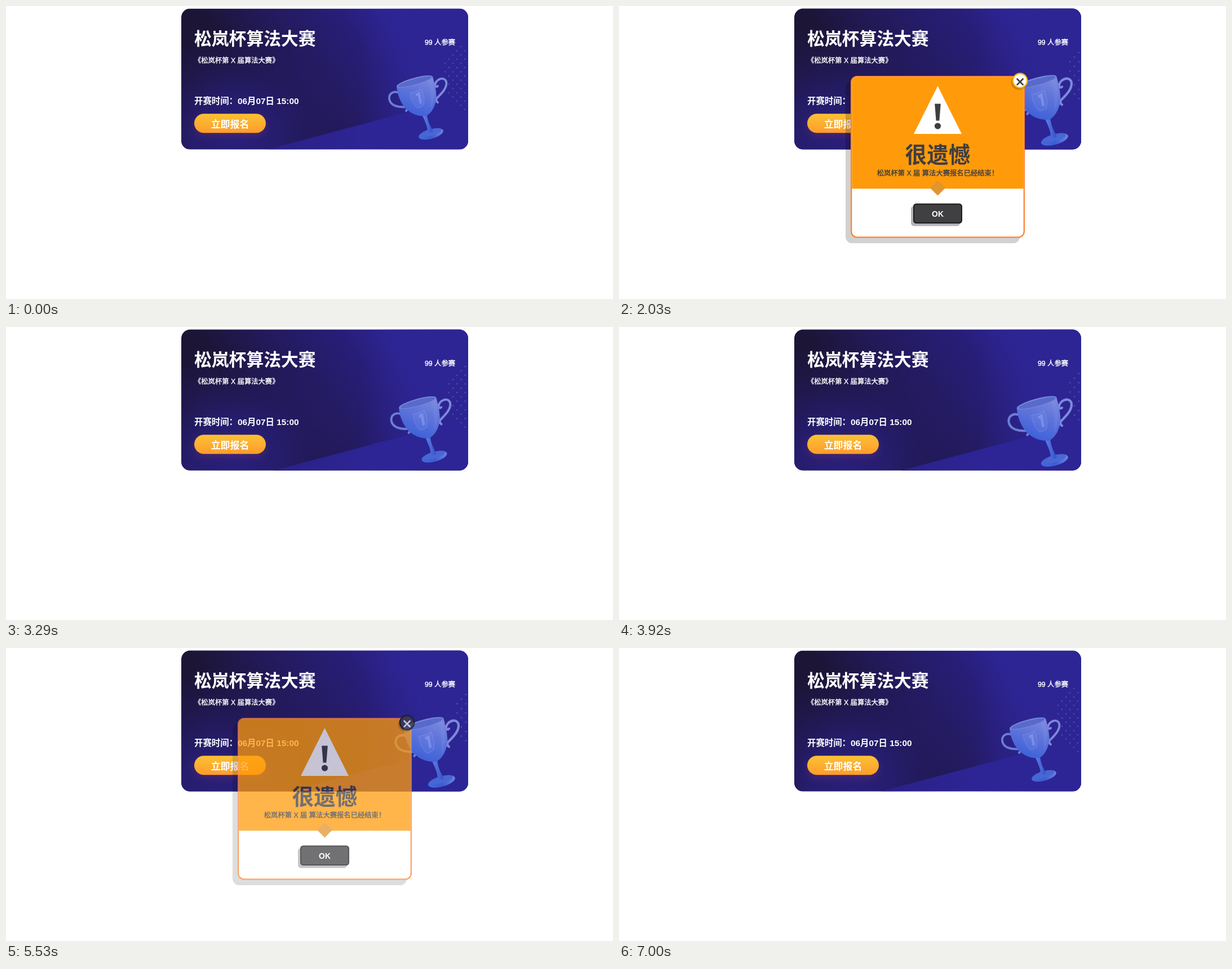
An HTML page with a canvas for the animation above (7.07 s loop, 1077 by 520 pixels).

```html
<!DOCTYPE html>
<html lang="zh-CN">
<head>
<meta charset="utf-8">
<title>算法大赛报名</title>
<style>
html, body { margin: 0; width: 100%; height: 100%; overflow: hidden; background: #fff; }
canvas { display: block; }
</style>
</head>
<body>
<canvas id="stage" width="1077" height="520"></canvas>
<script>
const W = 1077, H = 520, LOOP = 7070, STEP = 70;
const FONT = '"Liberation Sans", "Noto Sans CJK SC", "Noto Sans CJK", sans-serif';
const INK = '#403d40';
const CARD = { x: 311, y: 4.6, w: 509, h: 250, r: 15.5 };
const CX = CARD.x + CARD.w / 2, CY = CARD.y + CARD.h / 2;

const view = document.getElementById('stage').getContext('2d');
const layer = document.createElement('canvas');
layer.width = W;
layer.height = H;
const pop = layer.getContext('2d');

// --- timing helpers ---
const clamp = v => Math.max(0, Math.min(1, v));

// CSS "ease": cubic-bezier(.25, .1, .25, 1)
function ease(x) {
  let lo = 0, hi = 1, u = x;
  for (let i = 0; i < 22; i++) {
    u = (lo + hi) / 2;
    const bx = 0.75 * u * (1 - u) * (1 - u) + 0.75 * u * u * (1 - u) + u ** 3;
    if (bx < x) lo = u; else hi = u;
  }
  return 0.3 * u * (1 - u) * (1 - u) + 3 * u * u * (1 - u) + u ** 3;
}
const ramp = (t, start, dur) => ease(clamp((t - start) / dur));
const pulse = (t, on, off, dur) => ramp(t, on, dur) - ramp(t, off, dur);

function mix(a, b, k) {
  return 'rgb(' + a.map((v, i) => Math.round(v + (b[i] - v) * k)).join(',') + ')';
}

// --- drawing helpers ---
function box(c, x, y, w, h, r, fill) {
  c.beginPath();
  c.roundRect(x, y, w, h, r);
  c.fillStyle = fill;
  c.fill();
}

function poly(c, pts, fill) {
  c.beginPath();
  pts.forEach(p => c.lineTo(p[0], p[1]));
  c.closePath();
  c.fillStyle = fill;
  c.fill();
}

function disc(c, x, y, rx, ry, rot, fill) {
  c.beginPath();
  c.ellipse(x, y, rx, ry, rot, 0, 2 * Math.PI);
  c.fillStyle = fill;
  c.fill();
}

function label(c, str, x, y, size, weight, fill, align = 'left') {
  c.font = `${weight} ${size}px ${FONT}`;
  c.textAlign = align;
  c.fillStyle = fill;
  c.fillText(str, x, y);
}

// Medium weight: regular glyphs with a hairline outline
function medium(c, str, x, y, size, fill, align) {
  label(c, str, x, y, size, 400, fill, align);
  c.lineWidth = 0.4;
  c.lineJoin = 'round';
  c.strokeStyle = fill;
  c.strokeText(str, x, y);
}

function gradient(c, x0, y0, x1, y1, stops) {
  const g = c.createLinearGradient(x0, y0, x1, y1);
  stops.forEach(([k, col]) => g.addColorStop(k, col));
  return g;
}

// --- card ---
function backdrop(c) {
  c.fillStyle = gradient(c, 340, 5, 572, -149,
    [[0, '#1c1536'], [0.35, '#231a5c'], [0.75, '#281e79'], [1, '#2d2594']]);
  c.fillRect(CARD.x, CARD.y, CARD.w, CARD.h);

  const glow = c.createRadialGradient(410, 240, 10, 410, 240, 200);
  glow.addColorStop(0, 'rgba(42,32,132,0.85)');
  glow.addColorStop(0.35, 'rgba(42,32,132,0.7)');
  glow.addColorStop(0.7, 'rgba(40,30,125,0.28)');
  glow.addColorStop(1, 'rgba(40,30,125,0)');
  c.fillStyle = glow;
  c.fillRect(CARD.x, CARD.y, CARD.w, CARD.h);

  c.fillStyle = gradient(c, 630, 0, 750, 0, [[0, 'rgba(45,37,148,0)'], [1, 'rgba(45,37,148,1)']]);
  c.fillRect(630, CARD.y, 190, CARD.h);

  poly(c, [[464, 254.6], [820, 160], [820, 254.6]],
    gradient(c, 464, 0, 640, 0, [[0, '#2a2086'], [1, '#2d2595']]));
}

function dots(c) {
  for (let row = 0; row < 16; row++) {
    for (let m = 0; m <= Math.min(5, row + 1, 15 - row); m++) {
      if ((m + row) % 2) disc(c, 814 - 7 * m, 72 + 7.45 * row, 1.3, 1.3, 0, '#5049ac');
    }
  }
}

function handle(c, path, col) {
  const p = new Path2D(path);
  c.lineCap = 'round';
  c.lineWidth = 4;
  c.strokeStyle = col;
  c.stroke(p);
  c.lineWidth = 1.2;
  c.strokeStyle = 'rgba(160,175,240,0.35)';
  c.stroke(p);
}

function trophy(c) {
  handle(c, 'M697 154C688 150 679 155 680 165C682 178 698 180 709 179M709 179Q714 182 710 186', '#6474cf');
  handle(c, 'M761 141C762 130 777 124 781 134C784 145 771 157 764 164M761 141Q763 145 766 142M764 164Q762 169 766 171', '#7682d6');

  // foot and stem
  disc(c, 754, 227, 22.5, 8.5, -0.27, gradient(c, 732, 230, 776, 222, [[0, '#4468dc'], [0.5, '#3c5cd2'], [1, '#6e84e0']]));
  disc(c, 754, 224.5, 19, 5.5, -0.27, '#4866d4');
  c.fillStyle = gradient(c, 740, 0, 756, 0, [[0, '#5c7ce4'], [1, '#3655cc']]);
  c.fill(new Path2D('M738 192L747 192C748 203 752 213 758 222Q754 226 748 224C748 212 742 203 738 192Z'));

  // bowl
  c.fillStyle = gradient(c, 750, 128, 724, 196, [[0, '#7a87dd'], [0.4, '#6075da'], [1, '#3c60d8']]);
  c.fill(new Path2D('M693 143C695 163 704 181 720 190C729 195 738 196 746 195C755 190 762 178 763.5 163C763.5 148 760 136 757 125Z'));
  c.fillStyle = 'rgba(135,150,235,0.2)';
  c.fill(new Path2D('M748 133L756 130C760 145 762 165 754 182C755 164 753 147 748 133Z'));

  // rim
  disc(c, 725, 134, 33, 6.5, -0.27, '#7888dc');
  disc(c, 725.5, 134.3, 31, 5, -0.27, '#586aca');

  // plain shield
  const shield = new Path2D('M717 154Q728 153 737 147Q744 163 741 176Q736 181 730 181Q719 172 717 154Z');
  c.fillStyle = 'rgba(135,150,235,0.15)';
  c.fill(shield);
  c.lineWidth = 1;
  c.strokeStyle = 'rgba(155,170,242,0.35)';
  c.stroke(shield);
  poly(c, [[727, 156], [734, 152], [738, 172], [734, 174], [731, 159], [728, 160]], 'rgba(155,172,245,0.45)');
}

function card(c, zoom) {
  c.save();
  c.beginPath();
  c.roundRect(CARD.x, CARD.y, CARD.w, CARD.h, CARD.r);
  c.clip();
  c.translate(CX, CY);
  c.scale(zoom, zoom);
  c.translate(-CX, -CY);
  backdrop(c);
  dots(c);
  trophy(c);
  c.restore();

  label(c, '松岚杯算法大赛', 334, 69, 30.8, 700, '#fff');
  medium(c, '《松岚杯第 X 届算法大赛》', 334, 100.5, 12.32, '#fff');
  medium(c, '99 人参赛', 797, 68.7, 12.32, '#fff', 'right');
  label(c, '开赛时间：06月07日 15:00', 334, 173.5, 15.4, 700, '#fff');

  c.save();
  c.shadowColor = 'rgba(200,70,90,0.2)';
  c.shadowBlur = 14;
  c.shadowOffsetY = 5;
  box(c, 334, 191.3, 127, 34, 17, gradient(c, 0, 191, 0, 225, [[0, '#fac236'], [1, '#ff9c2b']]));
  c.restore();
  label(c, '立即报名', 397.5, 215.8, 16.94, 700, '#fff', 'center');
}

// --- dialog ---
function okButton(c, k) {
  box(c, 518, 355, 87, 35.5, 5.5, '#b3b3b5');
  box(c, 522, 350.5, 87, 35.5, 5.5, mix([28, 28, 29], [240, 178, 12], k));
  box(c, 524, 352.5, 83, 31.5, 4, mix([64, 64, 66], [255, 196, 6], k));
  label(c, 'OK', 565.5, 373.5, 13.86, 700, mix([255, 255, 255], [64, 61, 64], k), 'center');
}

function closeButton(c, k) {
  disc(c, 709.5, 135, 13.8, 13.8, 0, 'rgba(0,0,0,0.2)');
  disc(c, 711.6, 132.4, 13.8, 13.8, 0, mix([255, 179, 10], [28, 28, 29], k));
  disc(c, 711.6, 132.4, 11.4, 11.4, 0, mix([255, 255, 255], [64, 64, 66], k));
  c.lineCap = 'butt';
  c.lineWidth = 2.7;
  c.strokeStyle = mix([64, 61, 64], [255, 255, 255], k);
  c.stroke(new Path2D('M705.8 128.8L717.4 140.4M717.4 128.8L705.8 140.4'));
}

function dialog(c, okHover, closeHover) {
  c.clearRect(0, 0, W, H);
  box(c, 402, 134, 309, 287, 11.5, 'rgba(0,0,0,0.18)');
  box(c, 411, 124, 309, 287.5, 11.5, '#fb8437');
  box(c, 413.3, 126.3, 304.4, 282.9, 9.2, '#fff');
  box(c, 413.3, 126.3, 304.4, 198, [9.2, 9.2, 0, 0], '#ff9b0a');

  poly(c, [[565.5, 142], [608, 227], [523, 227]], '#fff');
  poly(c, [[560.2, 173.5], [570.8, 173.5], [568.4, 203.5], [562.6, 203.5]], INK);
  disc(c, 565.5, 213, 5.6, 5.6, 0, INK);

  label(c, '很遗憾', 565.5, 277.5, 38.5, 700, INK, 'center');
  medium(c, '松岚杯第 X 届 算法大赛报名已经结束！', 565.5, 301, 12.32, INK, 'center');
  poly(c, [[565.5, 309.5], [579, 323], [565.5, 336.5], [552, 323]], '#e2942f');

  okButton(c, okHover);
  closeButton(c, closeHover);
}

function draw(t) {
  const zoom = 1 + 0.1 * (pulse(t, 1060, 3130, 400) + pulse(t, 3540, 6170, 400));
  const fade = (on, off) => clamp((t - on) / 190) - clamp((t - off) / 190);
  const shown = fade(1560, 3040) + fade(3940, 5480);

  view.fillStyle = '#fff';
  view.fillRect(0, 0, W, H);
  card(view, zoom);
  if (shown > 0) {
    dialog(pop, pulse(t, 2450, 3500, 400), ramp(t, 4645, 400));
    view.globalAlpha = shown;
    view.drawImage(layer, 0, 0);
    view.globalAlpha = 1;
  }
}

function tick() {
  const t = performance.now() % LOOP;
  draw(Math.floor(t / STEP) * STEP);
  requestAnimationFrame(tick);
}
tick();
</script>
</body>
</html>
```
